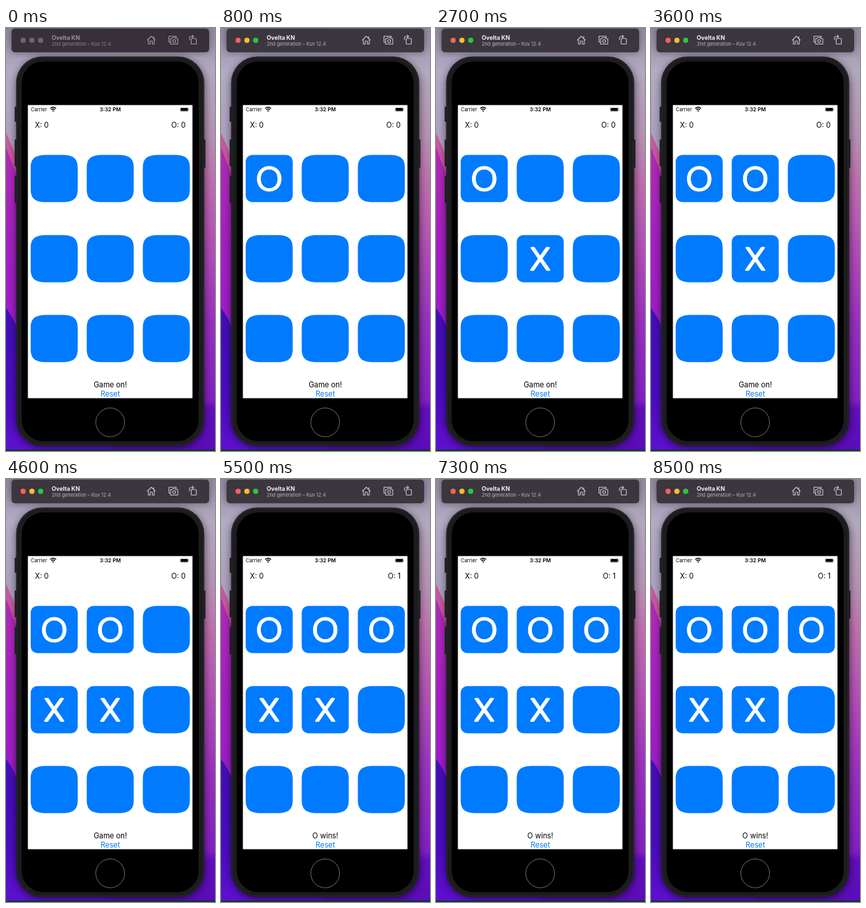
Animation, 320 px wide and 645 px high, one loop 8600 ms. Source, as an HTML page:

```html
<!DOCTYPE html>
<html lang="en">
<head>
<meta charset="utf-8">
<title>Tic-tac-toe</title>
<style>
html, body { margin: 0; width: 100%; height: 100%; overflow: hidden; background: #8d85a0; }
svg { display: block; width: 320px; height: 645px; font-family: Inter, Roboto, sans-serif; }
.mark { fill: #fff; stroke: #fff; stroke-linejoin: round; text-anchor: middle; }
.O { font: 400 52px Lato, sans-serif; stroke-width: .8px; }
.X { font: 300 47px Inter, sans-serif; stroke-width: 2.6px; }
.icon { fill: none; stroke: #cbc5cc; stroke-width: 1.1; stroke-linejoin: round; stroke-linecap: round; }
</style>
</head>
<body>
<svg viewBox="0 0 320 645">
  <defs>
    <linearGradient id="left" x1="0" y1="0" x2="0" y2="1">
      <stop offset="0" stop-color="#8f88a0"/>
      <stop offset=".1" stop-color="#b3abc4"/>
      <stop offset=".32" stop-color="#a99dbc"/>
    </linearGradient>
    <linearGradient id="magenta" x1="0" y1="0" x2="0" y2="1">
      <stop offset="0" stop-color="#b02cb6"/>
      <stop offset=".5" stop-color="#a51fc4"/>
      <stop offset="1" stop-color="#9c1ccd"/>
    </linearGradient>
    <linearGradient id="violet" x1="0" y1="0" x2="0" y2="1">
      <stop offset="0" stop-color="#430fb8"/>
      <stop offset=".6" stop-color="#4a0cc0"/>
      <stop offset="1" stop-color="#5f10d0"/>
    </linearGradient>
    <linearGradient id="right" x1="0" y1="0" x2="0" y2="1">
      <stop offset="0" stop-color="#938ba2"/>
      <stop offset=".1" stop-color="#b3a9be"/>
      <stop offset=".25" stop-color="#b693b4"/>
      <stop offset=".36" stop-color="#c070b0"/>
      <stop offset=".52" stop-color="#b44fb8"/>
      <stop offset=".7" stop-color="#9a30c0"/>
      <stop offset=".88" stop-color="#8420c4"/>
      <stop offset=".9" stop-color="#640fbe"/>
      <stop offset="1" stop-color="#5a0cb8"/>
    </linearGradient>
    <filter id="blur" x="-20%" y="-20%" width="140%" height="140%"><feGaussianBlur stdDeviation="6"/></filter>
  </defs>

  <rect width="160" height="645" fill="url(#left)"/>
  <rect x="160" width="160" height="645" fill="url(#right)"/>
  <path d="M0 160L16 196L60 300V645H0Z" fill="#c8589f"/>
  <path d="M0 182L16 224L60 300V480H0Z" fill="url(#magenta)"/>
  <path d="M0 427Q9 438 16 455L60 560L160 632V645H0Z" fill="url(#violet)"/>
  <rect x="15" y="45" width="290" height="596" rx="42" opacity=".5" filter="url(#blur)"/>
  <rect y="643" width="320" height="2" fill="#073d1c"/>

  <rect x="8.5" y="1" width="302.5" height="36" rx="5" opacity=".4" filter="url(#blur)"/>
  <rect id="bar" x="8.5" y="1" width="302.5" height="36" rx="5"/>
  <g id="lights"><circle cx="26.2" cy="18.8" r="4"/><circle cx="39.7" cy="18.8" r="4"/><circle cx="53.1" cy="18.8" r="4"/></g>
  <text id="device" x="70" y="17.5" font-size="8.8" font-weight="700">Ovelta KN</text>
  <text id="system" x="70" y="27" font-size="7.4">2nd generation – Kuv 12.4</text>
  <g class="icon" id="icons">
    <path d="M216.5 18.5L222.5 12.5L228.5 18.5M218 17.5V24.5H220.8V20H224.2V24.5H227V17.5M226.3 13V15.5"/>
    <path d="M251.5 21.5H249.5V12.5H260.5V14.5"/>
    <path d="M252 16H254.5L255.5 14.5H259L260 16H263V24.5H252Z"/>
    <circle cx="257.4" cy="20" r="2.2"/>
    <rect x="283.5" y="16" width="8" height="8.5" rx="1"/>
    <path d="M281 18V15Q281 13 283 13H287M285.2 11L287.2 13L285.2 15"/>
  </g>

  <g fill="#1f1d21">
    <rect x="13.3" y="120" width="5" height="23" rx="1"/>
    <rect x="13.3" y="170" width="5" height="41" rx="1"/>
    <rect x="13.3" y="226" width="5" height="41" rx="1"/>
    <rect x="300" y="170" width="5.3" height="43" rx="1"/>
  </g>
  <rect x="15.5" y="43.5" width="288" height="594" rx="40" fill="#1c1c1e"/>
  <rect x="17" y="45" width="285" height="591" rx="39" fill="none" stroke="#29292b"/>
  <rect x="24" y="51" width="271" height="579" rx="33"/>
  <circle cx="159.5" cy="601.3" r="22" fill="none" stroke="#707070"/>

  <rect x="33.5" y="117.5" width="252" height="447" fill="#fff"/>
  <text x="38" y="127" font-size="7.6">Carrier</text>
  <g fill="none" stroke="#000" stroke-width="1.4">
    <path d="M67.7 122.8Q72.2 118.9 76.7 122.8M69.4 124.8Q72.2 122.3 75 124.8"/>
    <path d="M72.2 127.8L70.8 126.2Q72.2 125 73.6 126.2Z" fill="#000" stroke="none"/>
  </g>
  <text x="159.7" y="127" font-size="8" font-weight="600" text-anchor="middle">3:32 PM</text>
  <rect x="266.5" y="121" width="13" height="6.3" rx="1.8" fill="none" stroke="#999" stroke-width=".6"/>
  <rect x="267.4" y="121.9" width="11.2" height="4.5" rx="1"/>
  <path d="M280.6 123.2Q281.8 124.1 280.6 125.2Z" fill="#777"/>
  <text x="44.3" y="152" font-size="11.2">X: 0</text>
  <text id="score" x="275" y="152" font-size="11.2" text-anchor="end"></text>
  <g id="board"></g>
  <text id="status" x="159.7" y="548" font-size="11.3" text-anchor="middle"></text>
  <text x="159.7" y="562" font-size="11.3" text-anchor="middle" fill="#007aff">Reset</text>
</svg>
<script>
const LOOP = 8600, FOCUS = 200, SIZE = 72;
const MOVES = [
  { at: 600, cell: 0, mark: 'O' },
  { at: 2100, cell: 4, mark: 'X' },
  { at: 3100, cell: 1, mark: 'O' },
  { at: 4100, cell: 3, mark: 'X' },
  { at: 5000, cell: 2, mark: 'O' }
];
const WIN = MOVES[MOVES.length - 1].at;
const COLS = [37.8, 123.6, 209.5], ROWS = [193.6, 315.8, 437.5];
const byId = id => document.getElementById(id);

function add(name, attrs) {
  const node = document.createElementNS('http://www.w3.org/2000/svg', name);
  for (const key in attrs) node.setAttribute(key, attrs[key]);
  return byId('board').appendChild(node);
}

// Square with smooth corners spanning a by b; bend pulls the curve towards the corner.
function tile(x, y, a, b, bend) {
  const w = SIZE - 2 * a, h = SIZE - 2 * b, p = a * bend, q = b * bend;
  return `M${x + a} ${y}h${w}c${p} 0 ${a} ${b - q} ${a} ${b}v${h}` +
    `c0 ${q} ${p - a} ${b} ${-a} ${b}h${-w}c${-p} 0 ${-a} ${q - b} ${-a} ${-b}v${-h}` +
    `c0 ${-q} ${a - p} ${-b} ${a} ${-b}z`;
}

const cells = Array.from({ length: 9 }, (_, i) => {
  const x = COLS[i % 3], y = ROWS[Math.floor(i / 3)];
  const box = add('path', { fill: '#007aff' });
  const label = add('text', { x: x + SIZE / 2 });
  return { x, y, box, label };
});

function setCell({ x, y, box, label }, mark) {
  box.setAttribute('d', mark ? tile(x, y, 11, 11, 0.6) : tile(x, y, 25, 20, 0.74));
  label.textContent = mark;
  label.setAttribute('class', 'mark ' + mark);
  label.setAttribute('y', y + (mark === 'X' ? 53.4 : 55.4));
}

function draw(t) {
  const active = t >= FOCUS, won = t >= WIN;
  const lights = active ? ['#fe5f57', '#febc2e', '#28c840'] : ['#6d666e', '#6d666e', '#6d666e'];
  [...byId('lights').children].forEach((dot, i) => dot.setAttribute('fill', lights[i]));
  byId('bar').setAttribute('fill', active ? '#3c363f' : '#372f39');
  byId('device').setAttribute('fill', active ? '#f4f1f4' : '#99919b');
  byId('system').setAttribute('fill', active ? '#bbb4bd' : '#8b838d');
  byId('icons').setAttribute('opacity', active ? 1 : 0.75);
  cells.forEach((cell, i) => {
    const move = MOVES.find(m => m.cell === i && t >= m.at);
    setCell(cell, move ? move.mark : '');
  });
  byId('score').textContent = won ? 'O: 1' : 'O: 0';
  byId('status').textContent = won ? 'O wins!' : 'Game on!';
}

const start = performance.now();
function tick() {
  draw((performance.now() - start) % LOOP);
  requestAnimationFrame(tick);
}
draw(0);
requestAnimationFrame(tick);
</script>
</body>
</html>
```
